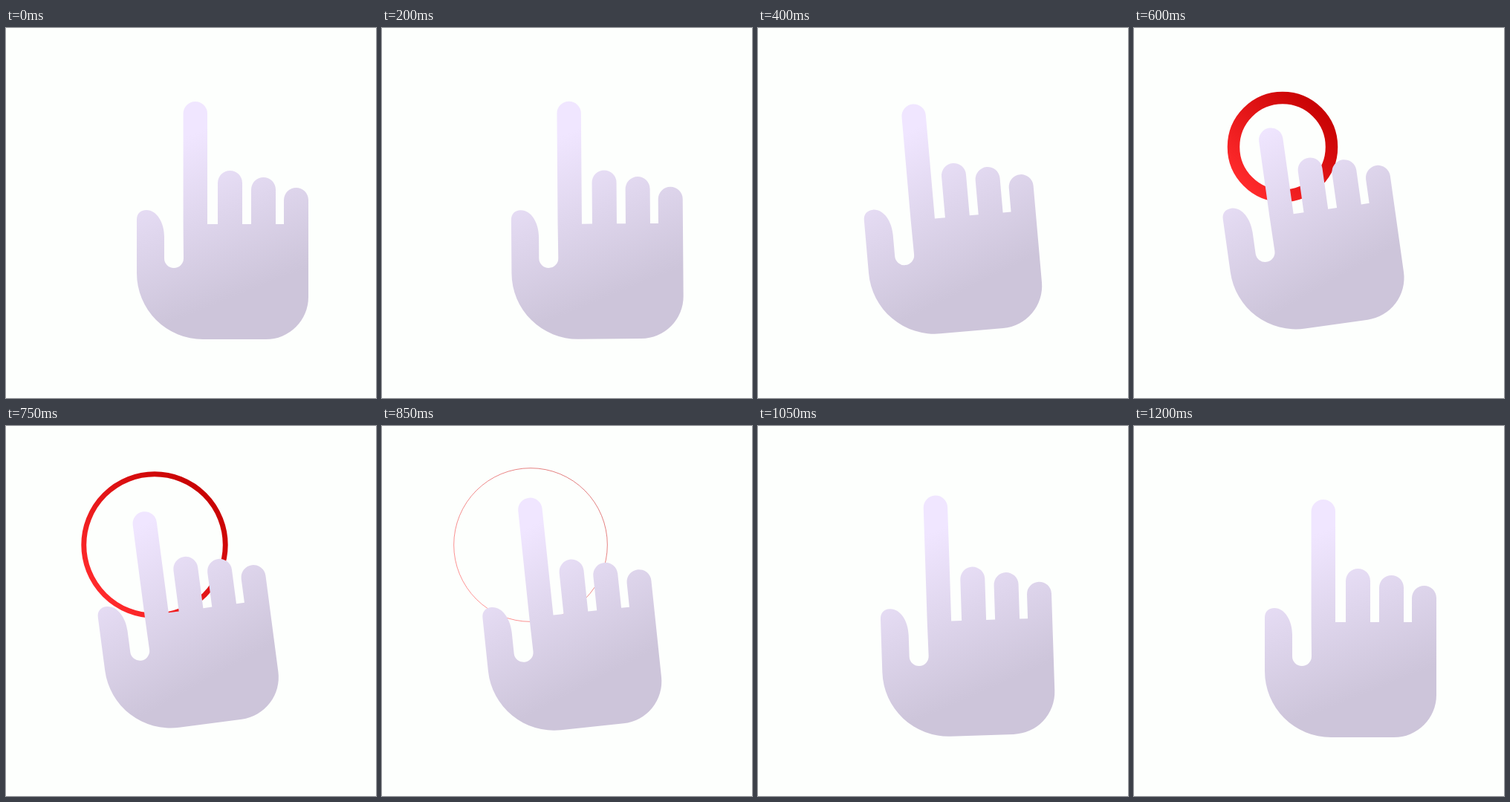
Animation, 498 px wide and 498 px high, one loop 1650 ms. Source, as an HTML page with a canvas:

```html
<!DOCTYPE html>
<html lang="en">
<head>
<meta charset="utf-8">
<title>Tap</title>
<style>
  html, body { margin: 0; width: 100%; height: 100%; overflow: hidden; background: #fdfffd; }
  canvas { display: block; width: 498px; height: 498px; }
</style>
</head>
<body>
<canvas id="stage" width="498" height="498"></canvas>
<script>
const ctx = document.getElementById('stage').getContext('2d');
const LOOP = 1650, STEP = 50;
const PIVOT = { x: 226, y: 310 };
const RING = { x: 200, y: 160, r: 104.3 };

const progress = (t, start, end) => Math.min(1, Math.max(0, (t - start) / (end - start)));

function ease(t, start, end) {
  const p = progress(t, start, end);
  return p * p * (3 - 2 * p);
}

// How far the hand has swung towards the tap, 0 to 1
const swing = t => ease(t, 150, 600) - ease(t, 660, 1200);

// How much the index finger shortens; it overshoots on release
const press = t => 46 * ease(t, 320, 600) - 51.5 * ease(t, 600, 950) + 5.5 * ease(t, 1000, 1200);

function gradient(x0, y0, x1, y1, from, to) {
  const g = ctx.createLinearGradient(x0, y0, x1, y1);
  g.addColorStop(0, from);
  g.addColorStop(1, to);
  return g;
}

function drawRing(t) {
  const r = RING.r * (1 - (1 - progress(t, 420, 950)) ** 3);
  const width = Math.min(r, 16.5 * (858 - t) / 258);
  if (width <= 0) return;
  const k = r * 0.7;
  ctx.strokeStyle = gradient(RING.x - k, RING.y + k, RING.x + k, RING.y - k, '#ff2a2c', '#c80203');
  ctx.lineWidth = width;
  ctx.beginPath();
  ctx.arc(RING.x, RING.y, r - width / 2, 0, Math.PI * 2);
  ctx.stroke();
}

function finger(left, right, top) {
  const r = (right - left) / 2;
  ctx.lineTo(left, 264);
  ctx.arc(left + r, top + r, r, Math.PI, 0);
  ctx.lineTo(right, 264);
}

function drawHand(t) {
  const a = swing(t);
  ctx.save();
  ctx.translate(PIVOT.x - 49.5 * a, PIVOT.y - 10 * Math.max(0, a - 0.2));
  ctx.rotate(-8 * a ** 0.87 * Math.PI / 180);
  ctx.translate(-PIVOT.x, -PIVOT.y);

  ctx.fillStyle = gradient(247, 144, 330, 353, '#f0e6ff', '#cdc5da');
  ctx.beginPath();
  ctx.moveTo(176, 330);
  ctx.lineTo(176, 258);
  ctx.bezierCurveTo(176, 250, 181, 245, 189, 245);
  ctx.bezierCurveTo(203, 245, 213, 262, 213, 281);
  ctx.arc(PIVOT.x, PIVOT.y, 13, Math.PI, 0, true);
  finger(238.6, 271, 99 + press(t));
  finger(285, 318, 192);
  finger(330, 363, 201);
  finger(374, 407, 215);
  ctx.arc(350, 362, 57, 0, Math.PI / 2);
  ctx.arc(265, 330, 89, Math.PI / 2, Math.PI);
  ctx.closePath();
  ctx.fill();
  ctx.restore();
}

function frame(now) {
  const t = Math.floor((now % LOOP) / STEP) * STEP;
  ctx.fillStyle = '#fdfffd';
  ctx.fillRect(0, 0, 498, 498);
  drawRing(t);
  drawHand(t);
  requestAnimationFrame(frame);
}

frame(performance.now());
</script>
</body>
</html>
```
